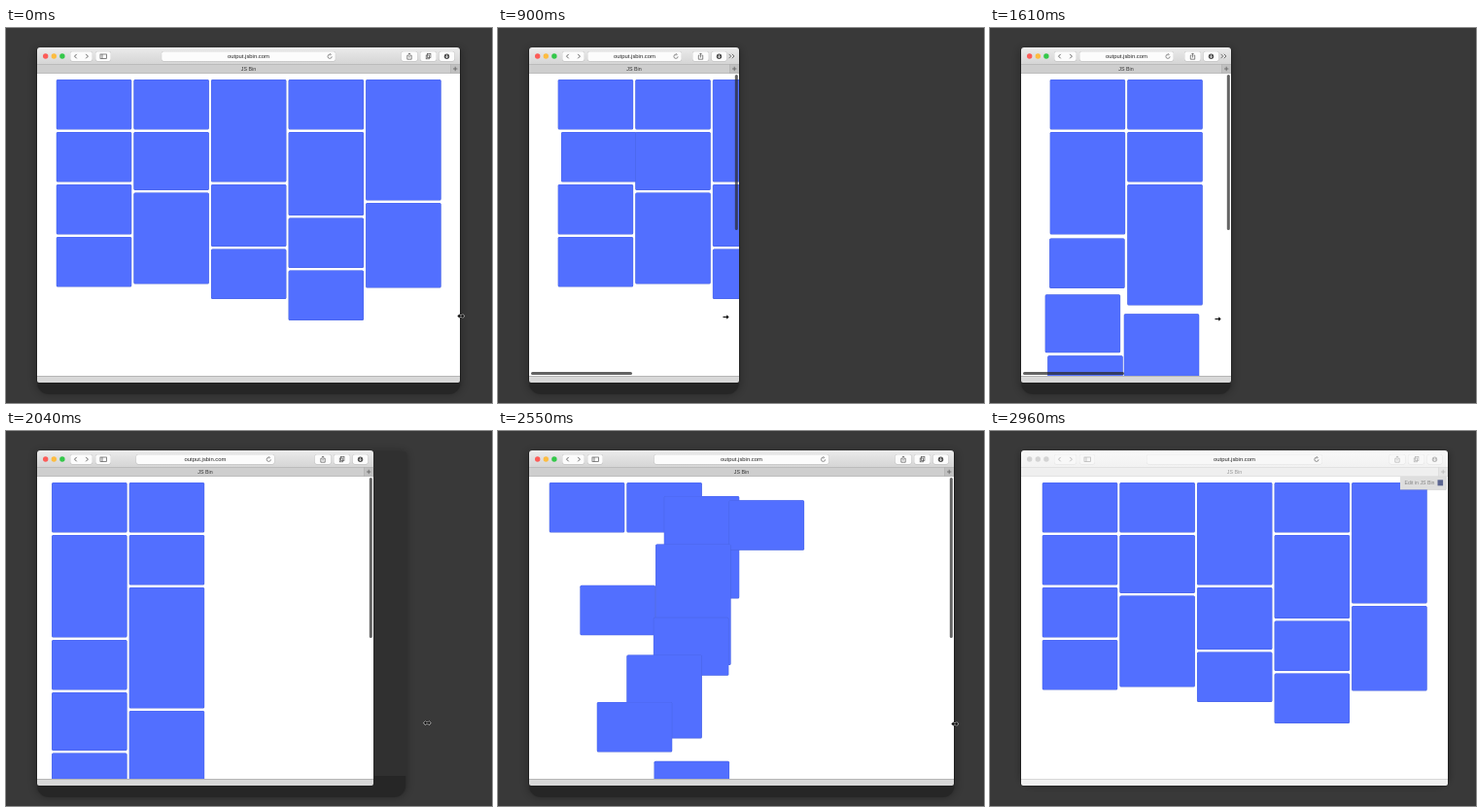
An HTML page with a canvas for the animation above (3.96 s loop, 500 by 386 pixels).

```html
<!DOCTYPE html>
<html lang="en">
<head>
<meta charset="utf-8">
<title>Masonry resize</title>
<style>
  html, body { margin: 0; width: 100%; height: 100%; overflow: hidden; background: #393939; }
  canvas { display: block; width: 500px; height: 386px; }
</style>
</head>
<body>
<canvas id="stage"></canvas>
<script>
const W = 500, H = 386, LOOP = 3960;
const SHRINK = 620, GROW = 1790, SETTLED = 2960;
const canvas = document.getElementById('stage');
const ctx = canvas.getContext('2d');
const dpr = window.devicePixelRatio || 1;
canvas.width = W * dpr;
canvas.height = H * dpr;
ctx.scale(dpr, dpr);

// Time helpers: a ramp between two moments, and a coarse clock
const ramp = (t, t0, t1, a, b) => a + (b - a) * Math.min(1, Math.max(0, (t - t0) / (t1 - t0)));
const grid = (t, anchor, step) => anchor + Math.floor((t - anchor) / step) * step;
const snap = t => t < GROW ? grid(t, 890, 90) : grid(t, 2310, 110);

const rightEdge = t => t < GROW
  ? ramp(t, SHRINK, 880, 467, 248)
  : ramp(t, GROW, 2110, 248, 467) + ramp(t, 2310, 2750, 0, 4);
const cursorX = t => t < GROW
  ? ramp(t, 470, 870, 468, 234)
  : ramp(t, GROW, 2013, 234, 468) + ramp(t, 2310, 2750, 0, 4);

// Masonry layout: every item goes to the shortest column
const LEFT = 32, TOP = 53, STEP = 79.6, ITEM_W = 77.5, GAP = 2.5, COUNT = 16;
const TALL = { 2: 105.5, 4: 124.5, 6: 60, 7: 86, 9: 64, 10: 94, 11: 87.5 };
const HEIGHTS = Array.from({ length: COUNT }, (_, i) => TALL[i] || 51.5);

function layout(cols) {
  const ends = Array(cols).fill(TOP);
  return HEIGHTS.map(h => {
    const c = ends.indexOf(Math.min(...ends));
    const spot = { x: c * STEP, y: ends[c] };
    ends[c] += h + GAP;
    return spot;
  });
}

// Each relayout sends the items off one after another.
const FULL = layout(5), MEDIUM = layout(4), NARROW = layout(2);
const RELAYOUTS = [[650, MEDIUM], [830, NARROW], [2070, MEDIUM], [2250, FULL]];
const DURATION = 600, STAGGER = 40;

const bezier = (s, a, b) => 3 * s * (1 - s) ** 2 * a + 3 * s * s * (1 - s) * b + s ** 3;

function ease(x) {
  if (x >= 1) return 1;
  let lo = 0, hi = 1;
  for (let n = 0; n < 24; n++) {
    const mid = (lo + hi) / 2;
    if (bezier(mid, 0.3, 0.4) < x) lo = mid; else hi = mid;
  }
  return bezier(lo, 0.1, 1.27);
}

function itemAt(i, t, k = RELAYOUTS.length - 1) {
  if (k < 0 || t >= SETTLED) return FULL[i];
  const [begin, spots] = RELAYOUTS[k];
  const start = begin + i * STAGGER;
  if (t <= start) return itemAt(i, t, k - 1);
  const from = itemAt(i, start, k - 1), to = spots[i];
  const p = ease((t - start) / DURATION);
  return { x: from.x + (to.x - from.x) * p, y: from.y + (to.y - from.y) * p };
}

// Drawing helpers
function rect(x, y, w, h, color) {
  ctx.fillStyle = color;
  ctx.fillRect(x, y, w, h);
}
function round(x, y, w, h, r, color) {
  ctx.fillStyle = color;
  ctx.beginPath();
  ctx.roundRect(x, y, w, h, r);
  ctx.fill();
}
function dot(x, y, r, color) {
  ctx.fillStyle = color;
  ctx.beginPath();
  ctx.arc(x, y, r, 0, 7);
  ctx.fill();
}
function box(x, y, w, h, color) {
  ctx.strokeStyle = color;
  ctx.lineWidth = 0.7;
  ctx.strokeRect(x, y, w, h);
}
function line(color, width, ...paths) {
  ctx.strokeStyle = color;
  ctx.lineWidth = width;
  ctx.beginPath();
  for (const p of paths) {
    ctx.moveTo(p[0], p[1]);
    for (let i = 2; i < p.length; i += 2) ctx.lineTo(p[i], p[i + 1]);
  }
  ctx.stroke();
}
// A "<" (dir -1) or ">" (dir 1) with its tip at x, y
function chevron(x, y, size, dir, color, width) {
  const back = x - dir * size;
  line(color, width, [back, y - size, x, y, back, y + size]);
}
function text(str, x, y, size, color) {
  ctx.font = size + 'px "Liberation Sans", Arial, sans-serif';
  ctx.textAlign = 'center';
  ctx.textBaseline = 'middle';
  ctx.fillStyle = color;
  ctx.fillText(str, x, y);
}
function button(x, w, idle) {
  round(x, 24, w, 10.5, 2, idle ? '#e4e4e4' : '#bdbdbd');
  round(x + 0.3, 24.2, w - 0.6, 9.8, 2, idle ? '#f8f8f8' : '#fcfcfc');
}

function drawShadow(right, cursor, idle) {
  const edge = right + Math.max(0, cursor - right) * 0.6;
  const w = edge - LEFT;
  ctx.save();
  ctx.shadowColor = 'rgba(0,0,0,.3)';
  ctx.shadowBlur = (idle ? 6 : 10) * dpr;
  round(LEFT - 1, 21, w + 2, idle ? 345 : 356, [4, 4, 12, 12], '#303030');
  ctx.restore();
  if (!idle) round(LEFT, 355, w, 22, [0, 0, 12, 12], '#262626');
  round(LEFT - 0.7, 20, right - LEFT + 1.4, 345.5, 3, '#1f1f1f');
}

function drawToolbar(right, small, idle) {
  const w = right - LEFT, mid = (LEFT + right) / 2;
  const ink = idle ? '#b4b4b4' : '#555';
  const bar = ctx.createLinearGradient(0, 20, 0, 37);
  bar.addColorStop(0, idle ? '#f8f8f8' : '#ebebeb');
  bar.addColorStop(1, idle ? '#f2f2f2' : '#d5d5d5');
  round(LEFT, 20, w, 18, [3, 3, 0, 0], bar);

  ['#fc5b57', '#fdbc40', '#34c84a'].forEach((c, i) =>
    dot(40.7 + i * 8.6, 29, 2.7, idle ? '#d3d3d3' : c));

  button(66, 23, idle);
  chevron(70.5, 29.1, 2.2, -1, ink, 0.9);
  chevron(84.4, 29.1, 2.2, 1, ink, 0.9);
  if (!small) {
    button(92, 16, idle);
    box(97, 27, 6.5, 4.5, ink);
    line(ink, 0.7, [99, 27, 99, 31.5]);
  }

  const fieldW = small ? 97 : w * 0.412;
  const fieldX = small ? 92 : mid - fieldW / 2;
  button(fieldX, fieldW, idle);
  text('output.jsbin.com', fieldX + fieldW / 2, 29.3, 5.9, '#222');
  const rx = fieldX + fieldW - 6;
  ctx.strokeStyle = '#666';
  ctx.lineWidth = 0.7;
  ctx.beginPath();
  ctx.arc(rx, 29.3, 2.1, 0, 5);
  ctx.stroke();
  chevron(rx + 1.2, 27.3, 1.1, 1, '#666', 0.7);

  const share = right - (small ? 48 : 60.5), sx = share + 8.5;
  button(share, 17, idle);
  line(ink, 0.7, [sx - 1, 28.2, sx - 2.2, 28.2, sx - 2.2, 32.2, sx + 2.2, 32.2, sx + 2.2, 28.2, sx + 1, 28.2],
    [sx, 30.5, sx, 26], [sx - 1.2, 27.1, sx, 25.9, sx + 1.2, 27.1]);
  const down = right - (small ? 28.5 : 21.5), dx = down + 8;
  button(down, 16, idle);
  dot(dx, 29.2, 2.7, idle ? '#bbb' : '#505050');
  line('#fff', 0.7, [dx, 27.5, dx, 30.5], [dx - 1.2, 29.4, dx, 30.7, dx + 1.2, 29.4]);
  if (small) {
    chevron(right - 8.3, 29, 2.2, 1, ink, 0.8);
    chevron(right - 5, 29, 2.2, 1, ink, 0.8);
  } else {
    button(right - 41, 17, idle);
    box(right - 33.5, 26.6, 3.4, 3.8, ink);
    box(right - 34.8, 28, 3.3, 3.8, ink);
  }
}

function drawTabs(right, idle) {
  const w = right - LEFT, edge = idle ? '#dadada' : '#b1b1b1';
  rect(LEFT, 37, w, 10, idle ? '#efefef' : '#cecece');
  rect(right - 10, 37, 10, 10, idle ? '#e6e6e6' : '#c0c0c0');
  rect(LEFT, 37, w, 0.6, edge);
  rect(LEFT, 46.4, w, 0.6, edge);
  rect(right - 10, 37, 0.6, 10, edge);
  line(idle ? '#b4b4b4' : '#555', 0.7, [right - 7, 42, right - 2.6, 42], [right - 4.8, 39.8, right - 4.8, 44.2]);
  text('JS Bin', (LEFT + right) / 2, 42.3, 5.3, idle ? '#999' : '#333');
}

function drawItems(t, right) {
  const room = right - LEFT;
  const cols = Math.floor(room / STEP);
  const base = LEFT + (room - cols * STEP + GAP) / 2;
  HEIGHTS.forEach((h, i) => {
    const { x, y } = itemAt(i, t);
    round(base + x, y, ITEM_W, h, 1.5, '#4863de');
    round(base + x + 0.4, y + 0.3, ITEM_W - 0.8, h - 0.9, 1.3, '#526fff');
  });
}

function drawScrollbars(right, small) {
  const color = 'rgba(40,40,40,.72)';
  round(right - 4.2, 48, 3, small ? 160 : 165, 1.5, color);
  if (small) round(34, 354, 104, 3, 1.5, color);
}

function drawCursor(x, y, oneWay) {
  for (const [color, width] of [['#e8e8e8', 2], ['#111', 1.1]]) {
    line(color, width, [x - 2.5, y, x + 2.5, y]);
    chevron(x + 2.8, y, 1.6, 1, color, width);
    if (!oneWay) chevron(x - 2.8, y, 1.6, -1, color, width);
  }
}

function drawBadge() {
  rect(422, 47, 47.5, 13.5, '#b9b9b9');
  rect(422, 47, 47, 13, '#dedede');
  text('Edit in JS Bin', 442, 53.3, 5.2, '#858585');
  rect(460.5, 50.3, 5.6, 6, '#5a6590');
}

function draw(t) {
  const idle = t >= SETTLED;
  const right = rightEdge(t), cursor = cursorX(t);
  const w = right - LEFT, small = right < 290;
  rect(0, 0, W, H, '#393939');
  drawShadow(right, cursor, idle);
  drawToolbar(right, small, idle);
  drawTabs(right, idle);
  rect(LEFT, 47, w, 311, '#fff');
  ctx.save();
  ctx.beginPath();
  ctx.rect(LEFT, 47, w, 311);
  ctx.clip();
  drawItems(t, right);
  if (t > 880 && !idle) drawScrollbars(right, small);
  ctx.restore();
  round(LEFT, 358, w, 7, [0, 0, 2, 2], idle ? '#f0f0f0' : '#d8d8d8');
  rect(LEFT, 358, w, 0.7, idle ? '#cfcfcf' : '#a8a8a8');
  if (idle) drawBadge();
  else drawCursor(cursor, ramp(t, 530, 2310, 296.5, 301.5), small);
}

const origin = performance.now();
function frame() {
  const t = (performance.now() - origin) % LOOP;
  draw(t >= SETTLED ? SETTLED : snap(t));
  requestAnimationFrame(frame);
}
frame();
</script>
</body>
</html>
```
